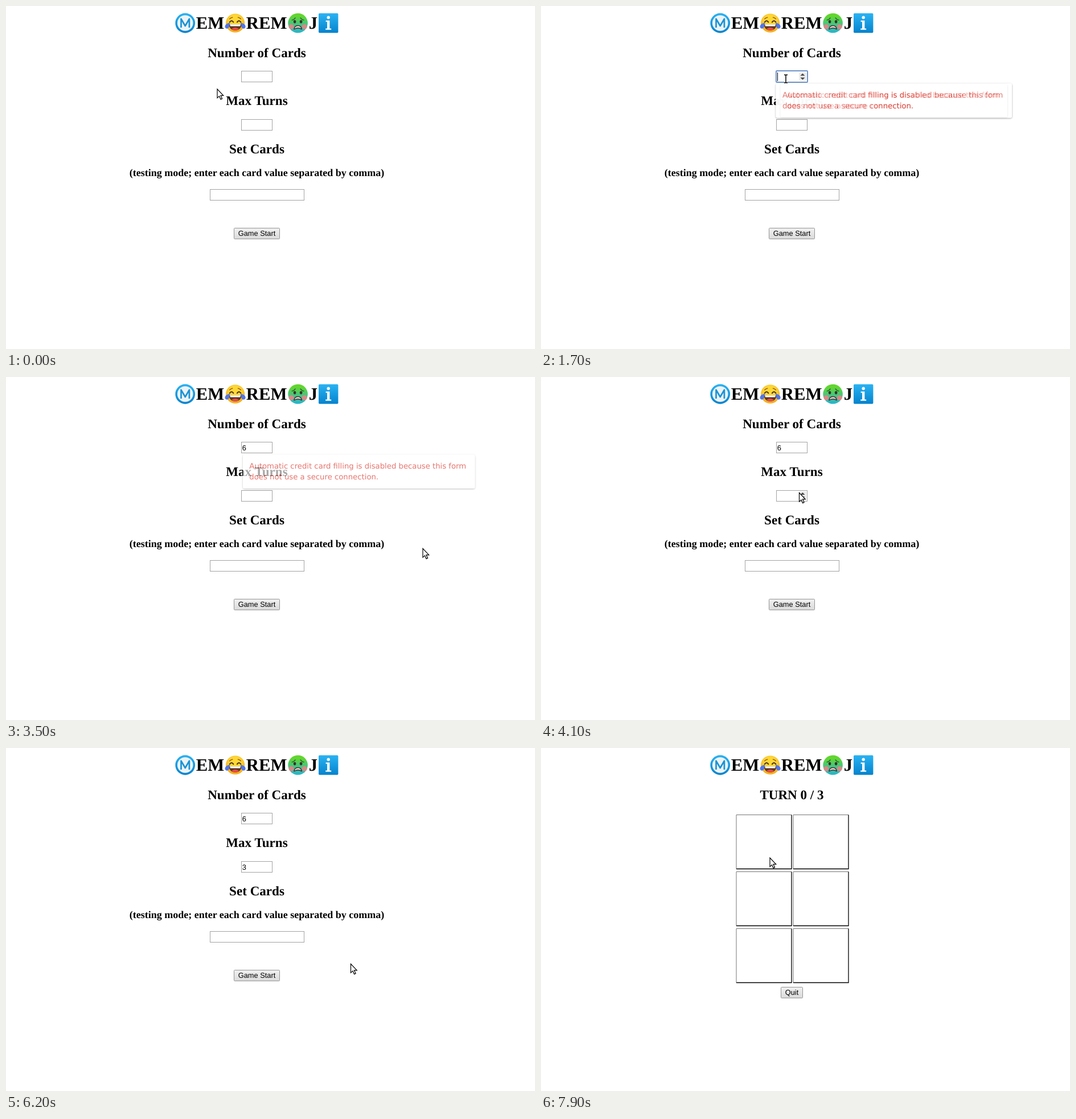
These frames come from a looping animation (929 by 603 pixels, 8000 ms). An HTML page:

```html
<!DOCTYPE html>
<html lang="en">
<head>
<meta charset="utf-8">
<title>Memory game</title>
<style>
  html, body { margin: 0; width: 100%; height: 100%; overflow: hidden; background: #fff; }
  svg { display: block; width: 929px; height: 603px; }
  text { text-rendering: geometricPrecision; white-space: pre; }
  .h { font-family: "Liberation Serif", serif; font-weight: 700; }
  .h1 { font-size: 30.77px; }
  .h2 { font-size: 23.08px; text-anchor: middle; }
  .h3 { font-size: 18px; text-anchor: middle; }
  .ui { font-family: "Liberation Sans", sans-serif; font-size: 12.82px; }
  .mid { text-anchor: middle; }
  .tip { font-family: "DejaVu Sans", sans-serif; font-size: 13.46px; fill: #d93025; }
  .field { fill: #fff; stroke: #a3a3a3; }
  .ring { fill: none; stroke: #5f90d8; stroke-width: 1.5; }
  .btn { stroke: #949494; }
</style>
</head>
<body>
<svg viewBox="0 0 929 603">
  <defs>
    <linearGradient id="blue" x2="0" y2="1"><stop stop-color="#2ab3f3"/><stop offset="1" stop-color="#0583cd"/></linearGradient>
    <radialGradient id="gold" cy=".4" r=".62"><stop offset=".5" stop-color="#fdd835"/><stop offset="1" stop-color="#f5a31a"/></radialGradient>
    <linearGradient id="sick" x2="0" y2="1"><stop offset=".15" stop-color="#62d62e"/><stop offset=".55" stop-color="#45c67f"/><stop offset="1" stop-color="#27b4cf"/></linearGradient>
    <linearGradient id="up" x2="0" y2="1"><stop stop-color="#f1f1f1"/><stop offset="1" stop-color="#dadada"/></linearGradient>
    <linearGradient id="over" x2="0" y2="1"><stop stop-color="#f8f8f8"/><stop offset="1" stop-color="#e4e4e4"/></linearGradient>
    <linearGradient id="down" x2="0" y2="1"><stop stop-color="#d8d8d8"/><stop offset="1" stop-color="#f3f3f3"/></linearGradient>
    <filter id="shade" x="-5%" y="-20%" width="110%" height="150%">
      <feDropShadow dx="0" dy="1" stdDeviation="1.5" flood-opacity=".38"/>
    </filter>
    <g id="spin">
      <rect x="453" y="2.5" width="13" height="15" rx="2" fill="#ececec"/>
      <path d="M455.3 8.5L459.4 4.4L463.5 8.5zM455.3 11.7L459.4 15.8L463.5 11.7z" fill="#484848"/>
    </g>
    <g id="popup">
      <rect x="412.5" y="136" width="414.5" height="60.5" rx="3" fill="#fff" filter="url(#shade)"/>
      <text class="tip" x="424" y="161.2">Automatic credit card filling is disabled because this form</text>
      <text class="tip" x="424" y="180.3">does not use a secure connection.</text>
    </g>
  </defs>

  <g class="h h1">
    <text x="333.8" y="40.3">EM</text><text x="421.7" y="40.3">REM</text><text x="531.8" y="40.3">J</text>
  </g>

  <g transform="translate(314.7 30)">
    <circle r="17.4" fill="url(#blue)"/>
    <circle r="13.8" fill="#edf3f6"/>
    <path d="M-7.2 8V-7.4L0 5L7.2 -7.4V8" fill="none" stroke="#1893d6" stroke-width="2.7" stroke-linejoin="round"/>
  </g>

  <g transform="translate(402.6 30)">
    <circle r="16.6" fill="url(#gold)"/>
    <path d="M-11 2.3H11C10.6 9.4 6 13 0 13S-10.6 9.4 -11 2.3z" fill="#5b3527"/>
    <path d="M-9.5 2.3H9.5L8.6 5.4H-8.6z" fill="#fff"/>
    <path d="M-6.7 10.2Q0 5.6 6.7 10.2Q0 15.2 -6.7 10.2z" fill="#ee4b45"/>
    <g id="side">
      <path d="M-9.8 -1.6Q-6.4 -6.2 -3.3 -1.6" fill="none" stroke="#4b2d22" stroke-width="2" stroke-linecap="round"/>
      <path d="M-9.8 -7.2Q-7.6 -9.8 -4.9 -10" fill="none" stroke="#9a5a20" stroke-width="1.5" stroke-linecap="round"/>
      <path d="M-9.2 -.2C-13 -.4 -17.8 2 -18 6.2C-18 10.6 -12.4 10.8 -10.9 7Q-10 3.5 -9.2 -.2z" fill="#5275e6"/>
    </g>
    <use href="#side" transform="scale(-1 1)"/>
  </g>

  <g transform="translate(512.6 30)">
    <circle r="17.3" fill="url(#sick)"/>
    <path d="M-6.6 10.8Q-6 4.6 0 4.6T6.6 10.8Q3.4 8.6 0 8.8T-6.6 10.8z" fill="#f0d2d0" stroke="#3d342f" stroke-width="1.5" stroke-linejoin="round"/>
    <g id="half">
      <circle cx="-11.6" cy="6.4" r="4.5" fill="#e98284" opacity=".9"/>
      <ellipse cx="-5.5" cy="-2.4" rx="2.3" ry="2.8" fill="#38302b"/>
      <path d="M-10.3 -5.3Q-6.4 -6 -4.6 -9.1" fill="none" stroke="#2e6a2a" stroke-width="1.6" stroke-linecap="round"/>
    </g>
    <use href="#half" transform="scale(-1 1)"/>
  </g>

  <g transform="translate(566.2 30)">
    <rect x="-17.2" y="-17.2" width="34.4" height="34.4" rx="1.8" fill="url(#blue)"/>
    <circle cy="-9.7" r="2.7" fill="#fff"/>
    <path d="M-4.6 -4.4H2.2V9.6H5V11.8H-5V9.6H-2.2V-2.2H-4.6z" fill="#fff"/>
  </g>

  <g id="setup">
    <text class="h h2" x="440.5" y="89.7">Number of Cards</text>
    <text class="h h2" x="440.5" y="174.2">Max Turns</text>
    <text class="h h2" x="440.5" y="258.7">Set Cards</text>
    <text class="h h3" x="440.5" y="298.7">(testing mode; enter each card value separated by comma)</text>
    <rect class="field" x="413.5" y="114.5" width="54" height="19"/>
    <rect class="field" x="413.5" y="199.5" width="54" height="19"/>
    <rect class="field" x="358.5" y="322.5" width="165" height="19"/>
    <use id="spin1" href="#spin" y="114"/>
    <use id="spin2" href="#spin" y="198.6"/>
    <rect id="ring1" class="ring" x="412.75" y="113.75" width="55.5" height="20.5" rx="1.5"/>
    <rect id="ring2" class="ring" x="412.75" y="198.5" width="55.5" height="20.5" rx="1.5"/>
    <text id="num1" class="ui" x="414.7" y="129">6</text>
    <text id="num2" class="ui" x="414.7" y="213.6">3</text>
    <rect id="caret" width="1" height="15"/>
    <rect id="start" class="btn" x="400.5" y="390.5" width="80" height="19" rx="1"/>
    <text class="ui mid" x="440.5" y="404.4">Game Start</text>
  </g>

  <g id="game">
    <text class="h h2" x="440.5" y="89.7">TURN 0 / 3</text>
    <g id="cards" fill="none"></g>
    <rect class="btn" x="421.5" y="420.5" width="38" height="19" rx="1" fill="url(#up)"/>
    <text class="ui mid" x="440.5" y="434.4">Quit</text>
  </g>

  <use id="pop1" href="#popup"/>
  <use id="pop2" href="#popup"/>

  <path id="arrow" d="M.5 .5V16.2L4 12.9L6.6 18.6L9.1 17.4L6.5 11.8H11.2z" fill="#fff" stroke="#000" stroke-width="1.2"/>
  <g id="beam" fill="none">
    <path d="M-3 -7H-1L0 -6L1 -7H3M0 -6V6M-3 7H-1L0 6L1 7H3" stroke="#fff" stroke-width="3.2"/>
    <path d="M-3 -7H-1L0 -6L1 -7H3M0 -6V6M-3 7H-1L0 6L1 7H3" stroke="#000" stroke-width="1.5"/>
  </g>
</svg>
<script>
const LOOP = 8000;
const el = id => document.getElementById(id);
const show = (id, on) => el(id).setAttribute("visibility", on ? "inherit" : "hidden");
const within = (t, a, b) => t >= a && t < b;

// Last row whose time has been reached.
const pick = (rows, t) => rows.reduce((hit, row) => row[0] <= t ? row : hit);

// time, shape, x, y
const pointer = [
  [0, "arrow", 370.5, 145.5], [100, "arrow", 393, 136], [200, "beam", 416, 125],
  [400, "beam", 429, 117], [1500, "beam", 430, 123], [1600, "beam", 430, 128],
  [3100, "arrow", 694, 262], [3300, "arrow", 736, 299.5], [3500, "arrow", 731.5, 301],
  [3700, "arrow", 542, 217], [3900, "arrow", 489.5, 217], [4100, "arrow", 453, 203],
  [4500, "beam", 438, 204], [5200, "beam", 435, 205], [5300, "beam", 432, 207],
  [5500, "beam", 430, 211], [6000, "arrow", 601, 364], [6200, "arrow", 605, 379],
  [6500, "arrow", 516.5, 410], [6800, "arrow", 472.5, 401], [7900, "arrow", 401.5, 192.5]
];
// time, opacity, scale
const closing = [
  [0, 0, 1], [1600, .6, .983], [1700, .33, .96], [1800, .1, .945], [1900, 0, 1],
  [3500, .66, .983], [3700, 0, 1]
];
const opening = [[0, 0], [700, 1], [1600, .7], [1700, .96], [1800, 1], [3500, 0]];
// time, x, y; no x means hidden
const caret = [
  [0], [700, 415, 117], [1900], [2500, 415, 117], [3100, 422, 117], [3500],
  [4700, 415, 201.5], [5300], [5700, 421, 201.5], [6200]
];
const button = [[0, "up"], [6800, "over"], [7100, "down"]];

function buildCards() {
  let out = "";
  for (let i = 0; i < 6; i++) {
    const x = 343 + i % 2 * 100, y = 117.5 + (i >> 1) * 100;
    out += `<path d="M${x} ${y + 95}V${y}H${x + 97}" stroke="#767676"/>` +
      `<path d="M${x} ${y + 95}H${x + 97}V${y}" stroke="#000" stroke-width="1.3"/>`;
  }
  el("cards").innerHTML = out;
}

function draw(t) {
  const playing = t >= 7500;
  show("setup", !playing);
  show("game", playing);

  show("ring1", within(t, 700, 3500));
  show("ring2", within(t, 4700, 6200));
  show("spin1", within(t, 200, 3500));
  show("spin2", within(t, 4100, 6200));
  show("num1", t >= 3100);
  show("num2", t >= 5700);

  const [, cx, cy] = pick(caret, t);
  show("caret", cx);
  if (cx) {
    el("caret").setAttribute("x", cx);
    el("caret").setAttribute("y", cy);
  }
  el("start").setAttribute("fill", `url(#${pick(button, t)[1]})`);

  el("pop1").setAttribute("opacity", pick(opening, t)[1]);
  const [, fade, size] = pick(closing, t);
  el("pop2").setAttribute("opacity", fade);
  el("pop2").setAttribute("transform", `translate(620 166.5) scale(${size}) translate(-620 -166.5)`);

  const [, shape, x, y] = pick(pointer, t);
  for (const id of ["arrow", "beam"]) show(id, id === shape);
  el(shape).setAttribute("transform", `translate(${x} ${y})`);
}

const begin = performance.now();
function tick() {
  draw((performance.now() - begin) % LOOP);
  requestAnimationFrame(tick);
}
buildCards();
tick();
</script>
</body>
</html>
```
